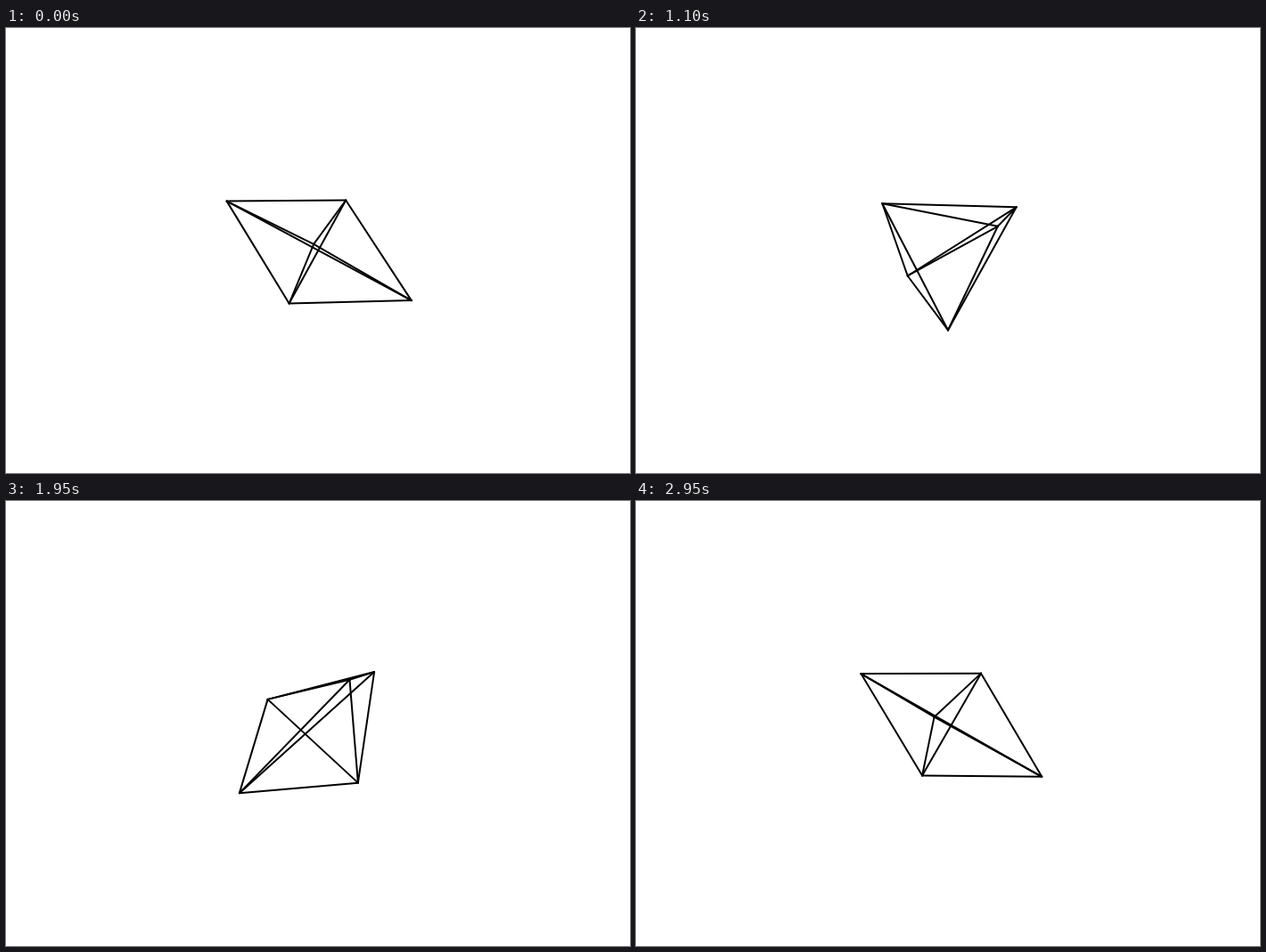
Animation, 700 px wide and 500 px high, one loop 3000 ms. Source, as an HTML page with a canvas:

```html
<!DOCTYPE html>
<html lang="en">
<head>
<meta charset="utf-8">
<title>Rotating wireframe</title>
<style>
  html, body { margin: 0; width: 100%; height: 100%; overflow: hidden; background: #fff; }
  canvas { display: block; }
</style>
</head>
<body>
<canvas id="stage" width="700" height="500"></canvas>
<script>
const ctx = document.getElementById('stage').getContext('2d');
const STEP = 50, STEPS = 60;
const TILT = 0.188;    // how far depth lifts a point on screen
const DEPTH = 0.0025;  // perspective strength per pixel of depth

// radius around the vertical axis, height (down is positive), step when farthest away
const points = [
  [107.5, -54.6, 46.4],
  [72.5, -53.6, 4.98],
  [101.8, 50.7, 16.55],
  [47, 70.1, 52],
  [81.5, -21, 30.45]
];

function project([radius, height, far], step) {
  const angle = (step - far) * 2 * Math.PI / STEPS;
  const depth = radius * Math.cos(angle);
  const scale = 1 / (1 + DEPTH * depth);
  return [
    350 - radius * Math.sin(angle) * scale,
    250 + (height - TILT * depth) * scale
  ];
}

function draw(ms) {
  const step = Math.floor(ms / STEP) % STEPS;
  const corners = points.map(p => project(p, step));
  ctx.fillStyle = '#fff';
  ctx.fillRect(0, 0, 700, 500);
  ctx.strokeStyle = '#000';
  ctx.lineWidth = 2;
  ctx.lineCap = 'round';
  // every pair of corners is joined
  corners.forEach((a, i) => {
    for (const b of corners.slice(i + 1)) {
      ctx.beginPath();
      ctx.moveTo(...a);
      ctx.lineTo(...b);
      ctx.stroke();
    }
  });
}

const start = performance.now();
function tick() {
  draw(performance.now() - start);
  requestAnimationFrame(tick);
}
tick();
</script>
</body>
</html>
```
